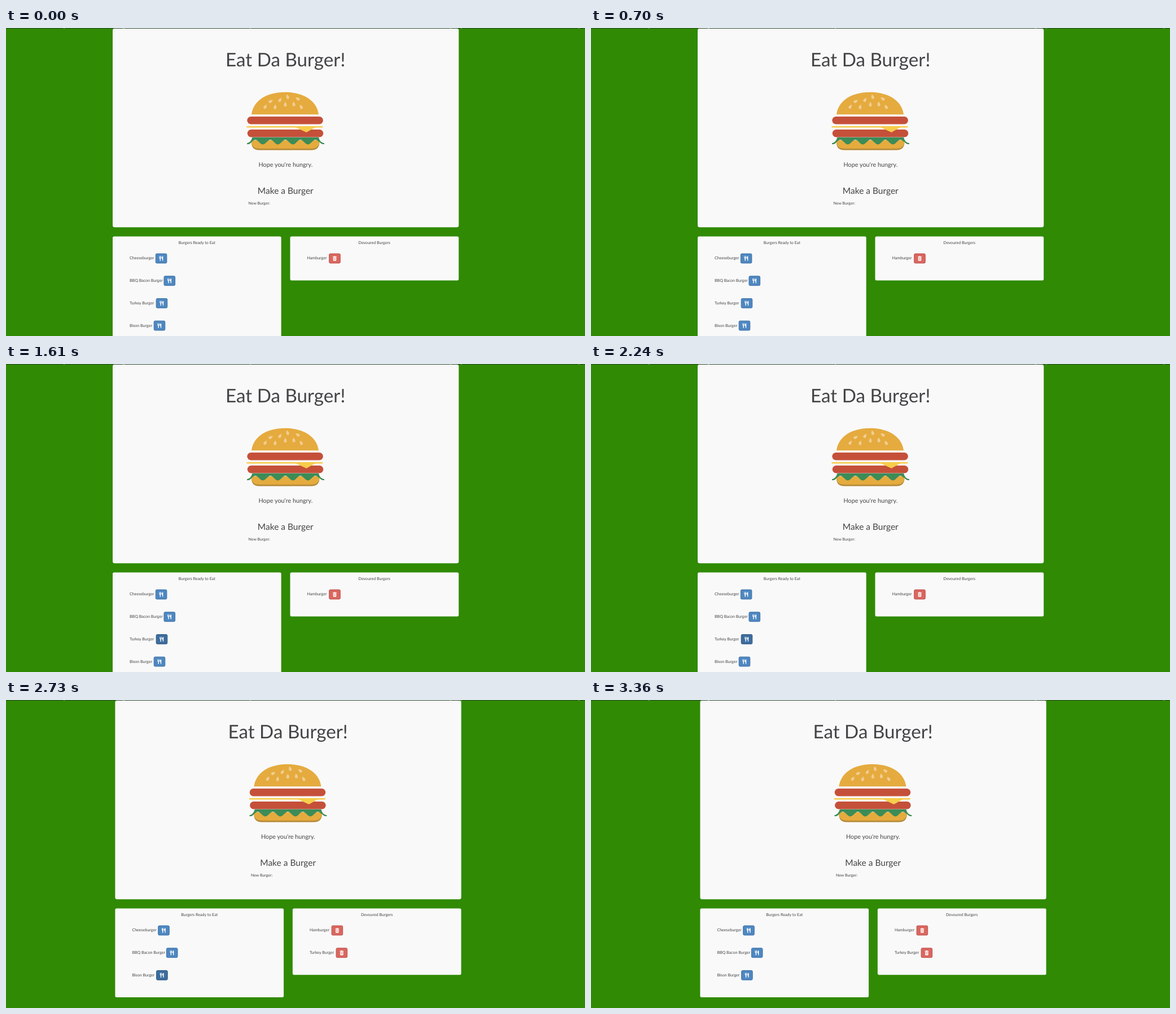
Recreate the animation shown at these times as an HTML page. Size 1026 by 546 pixels, loop 3430 ms.

```html
<!DOCTYPE html>
<html lang="en">
<head>
<meta charset="utf-8">
<title>Burger list</title>
<style>
  html, body { margin: 0; width: 100%; height: 100%; overflow: hidden; background: #308a03; }
  svg { display: block; }
  text { font: 7.1px Lato, "Noto Sans", sans-serif; fill: #444447; text-rendering: geometricPrecision; }
  .mid { text-anchor: middle; }
  .panel { fill: #f9f9f9; }
  .bun { fill: #e5ab3e; }
  .meat { fill: #c5503a; }
  .cheese { fill: #f7cd4b; }
  .leaf { fill: #3c8c57; }
  .eat { fill: #4e87c1; stroke: #4173a8; }
  .eat.hover { fill: #3c6d9d; stroke: #2d5580; }
  .drop { fill: #d9665f; stroke: #bf534d; }
</style>
</head>
<body>
<svg width="1026" height="546" viewBox="0 0 1026 546">
  <g id="page"></g>
  <path d="M0 .4H1026" stroke="#1d3526" stroke-width=".9"/>
  <path d="M102 .4h2m103 0h3m222 0h2m353 0h2m17 0h2m206 0h2" stroke="#9db39c" stroke-width=".8"/>
</svg>
<script>
const LOOP = 3430, MOVED = 2310, ROW = 39.7;
const page = document.getElementById('page');

const box = (x, y, w, h, r, cls) =>
  `<rect x="${x}" y="${y}" width="${w}" height="${h}" rx="${r}" class="${cls}"/>`;
const label = (x, y, str, size = 7.1, cls = 'mid') =>
  `<text x="${x}" y="${y}" class="${cls}" style="font-size:${size}px">${str}</text>`;

const cutlery = `<path fill="#fff" d="M-3.6-4.2h.8v3h.5v-3h.8v3h.5v-3h.8v3.6l-.9 1v3.6q-.7.8-1.4 0v-3.6l-1.1-1z
  M3.2-4.2v8q-.7.8-1.4 0v-3.2h-1.1v-2.6q.5-2 2.5-2.2z"/>`;
const trash = `<path fill="#fff" d="M-3.3-3.4h2.2v-.9h2.2v.9h2.2v1.1h-6.6zM-2.8-1.8h5.6v5.1q0 .9-.9.9h-3.8q-.9 0-.9-.9z"/>
  <path stroke="#d9665f" stroke-width=".5" d="M-1.3-.8v3.8M0-.8v3.8M1.3-.8v3.8"/>`;

// Left offset of each button from its panel edge
const offset = { Cheeseburger: 76.3, 'BBQ Bacon Burger': 91, 'Turkey Burger': 77.2, 'Bison Burger': 73.2, Hamburger: 69.2 };

function list(x, title, names, kind, icon, hover) {
  const rows = names.map((name, i) => {
    const y = 408.5 + i * ROW;
    return label(x + 30, y + 1.9, name, 7.1, '') +
      `<g transform="translate(${x + offset[name] + 9.8} ${y})">` +
      box(-9.8, -8.4, 19.6, 16.8, 2, `${kind} ${name === hover ? 'hover' : ''}`) + icon + '</g>';
  });
  return box(x, 369.5, 298.7, 38.4 + names.length * ROW, 2.5, 'panel') +
    label(x + 149.3, 383, title) + rows.join('');
}

function burger() {
  const seeds = [[469, 130, 62], [485.5, 127.5, 30], [499, 122, -15], [517, 125.5, -55], [459.5, 139.5, 35],
    [477, 140, 12], [495, 135.5, 0], [510, 135, -6], [523, 140, -32]];
  const seed = ([x, y, a]) =>
    `<path fill="#f2cd92" transform="translate(${x} ${y}) rotate(${a})" d="M0-4.4C3 -1 3.6 3.8 0 3.8S-3-1 0-4.4z"/>`;
  let wave = '';
  for (let x = 555; x >= 435; x -= 2)
    wave += `L${x} ${(202.3 - 4.2 * Math.cos((x - 495) / 26.6 * 2 * Math.PI)).toFixed(2)}`;
  return `<path class="bun" d="M435 153.3C438 130 460 113.8 494.5 113.8S551 130 554 153.3z"/>` +
    seeds.map(seed).join('') +
    box(427.3, 157, 134.6, 13.5, 6.7, 'meat') +
    box(426.5, 174, 134.8, 2.5, .5, 'cheese') +
    box(427.7, 180, 134.6, 13.5, 6.7, 'meat') +
    `<path class="cheese" d="M512 175.5H549L532.3 185z"/>
    <path fill="#b68a38" d="M435 200H555.5V203Q555 216.5 541 216.5H449Q435 216.5 435 203z"/>
    <path class="bun" d="M435 199H555.5V201Q555 213.7 541 213.7H449Q435 213.7 435 201z"/>
    <path class="leaf" d="M436.5 193.8H554Q556 203 564 204.3V206Q558 206.5 555 201${wave}Q432 206.5 427 206V204.3Q434 203 436.5 193.8z"/>`;
}

const header = box(189, .8, 613.3, 352.4, 3.5, 'panel') +
  label(495.2, 68.3, 'Eat Da Burger!', 33.2) + burger() +
  label(495.4, 245.6, "Hope you're hungry.", 10.8) +
  label(495.3, 293.5, 'Make a Burger', 15.5) +
  label(429.5, 312.6, 'New Burger:', 7, '');

function draw(moved, hover) {
  const ready = ['Cheeseburger', 'BBQ Bacon Burger', 'Turkey Burger', 'Bison Burger'];
  const eaten = ['Hamburger'];
  if (moved) eaten.push(...ready.splice(2, 1));
  page.setAttribute('transform', `translate(${moved ? 4.4 : 0} 0)`);
  page.innerHTML = header +
    list(189, 'Burgers Ready to Eat', ready, 'eat', cutlery, hover) +
    list(503.5, 'Devoured Burgers', eaten, 'drop', trash);
}

let last;
function frame() {
  const t = performance.now() % LOOP;
  const moved = t >= MOVED;
  const hover = t >= 1400 && !moved ? 'Turkey Burger' : t >= 2380 && t < 3010 ? 'Bison Burger' : '';
  const key = moved + hover;
  if (key !== last) draw(moved, hover);
  last = key;
  requestAnimationFrame(frame);
}
frame();
</script>
</body>
</html>
```
